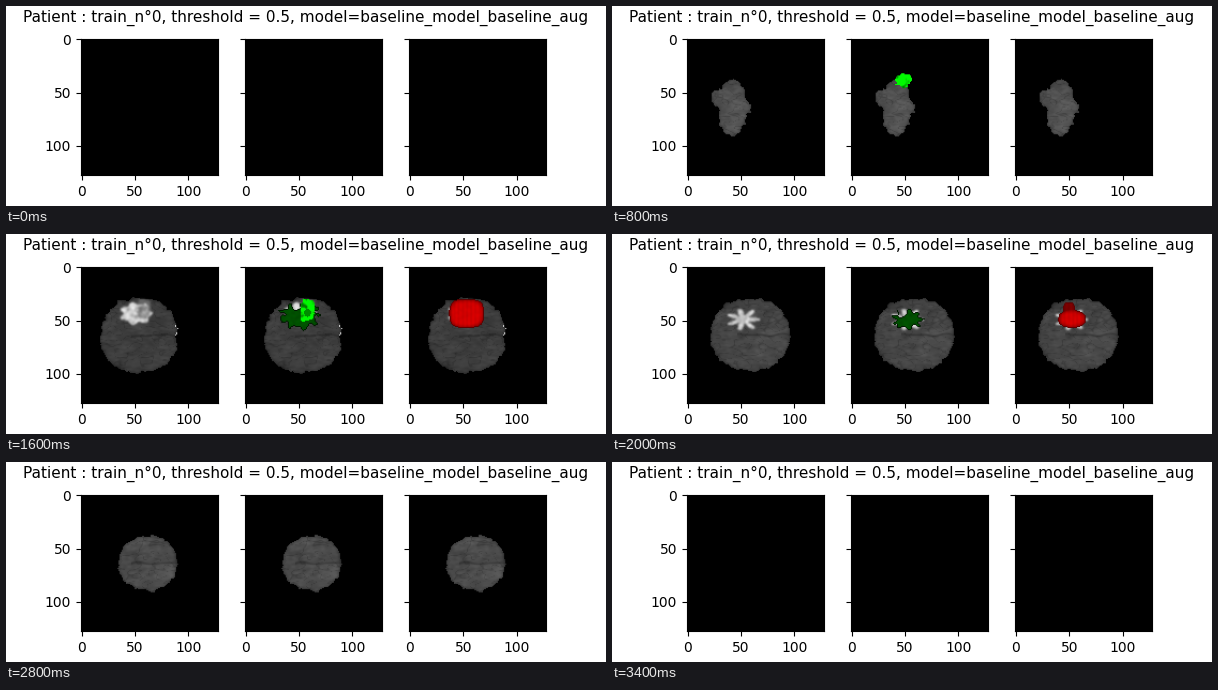
A matplotlib script that plays this animation: 600x200 px, repeating every 4 s.

```python
import numpy as np
import matplotlib.pyplot as plt
from matplotlib.animation import FuncAnimation

N, FRAMES, STEP = 128, 20, 200
FIRST, LAST = 2, 16
TITLE = "Patient : train_n°0, threshold = 0.5, model=baseline_model_baseline_aug"

# voxel centres in stage pixels of the first panel
SCALE = 136.76 / N
Y, X = np.mgrid[0:N, 0:N] * SCALE + SCALE / 2
X, Y = X + 75, Y + 32.6

# key slices: depth, centre x, centre y, radius x, radius y
HEAD = [(2, 121, 101, 14, 23), (4, 119, 102, 20, 28), (6, 126.5, 101, 32, 36.5),
        (8, 133, 102, 38, 37), (10, 138, 101, 39, 36), (13, 141, 102, 34, 33),
        (15, 143, 101, 24, 21), (16, 140.5, 98, 9, 8)]
EDEMA = [(4, 128, 76, 0, 0), (6, 129, 77, 23, 8.5), (8, 130, 82, 20, 13),
         (10, 131, 86, 15, 10), (13, 132, 86, 0, 0)]
CORE = [(3, 127, 75, 0, 0), (4, 127.5, 74.5, 8, 6.5), (6, 133, 74, 13.5, 8),
        (8, 137.5, 76.5, 7.5, 11), (10, 138, 85, 0, 0)]
GUESS = [(4, 134, 75, 0, 0), (6, 133.5, 78, 17.5, 12.5), (8, 132.5, 80, 17.5, 14.5),
         (10, 132, 85.5, 14, 9), (13, 132, 85, 0, 0)]
GLOW = [(4, 130, 75, 0, 0), (6, 133, 74.5, 14, 8.5), (8, 130, 80, 15.5, 10.5),
        (10, 131, 86, 14, 9.5), (13, 132, 85, 0, 0)]


def blur(a, sy, sx=None):
    f = np.fft.fftfreq(N)
    gy, gx = (np.exp(-2 * (np.pi * s * f) ** 2) for s in (sy, sx or sy))
    return np.fft.ifft2(np.fft.fft2(a) * np.outer(gy, gx)).real


def noise(rng, sy, sx=None):
    n = blur(rng.standard_normal((N, N)), sy, sx)
    return n / n.std()


def at(track, k):
    """Centre and radii of a track at slice k."""
    ks, *cols = zip(*track)
    return [np.interp(k, ks, c) for c in cols]


def blob(geom, x, y, p=2.0, spikes=0, amp=0.0, bend=0.0):
    cx, cy, rx, ry = geom
    if min(rx, ry) <= 0:
        return np.zeros((N, N), bool)
    u = (x - cx) / rx
    v = (y - cy - bend * u ** 2) / ry
    r = (abs(u) ** p + abs(v) ** p) ** (1 / p)
    return r < 1 + amp * (np.cos(spikes * np.arctan2(v, u)) - .5)


def rim(m):
    inner = m.copy()
    for axis in (0, 1):
        for d in (-1, 1):
            inner &= np.roll(m, d, axis)
    return m & ~inner


def head_mask(k, x, y):
    cx, cy, rx, ry = at(HEAD, k)
    if k <= 4:
        # brain base: tall body with a bump on each side
        return (blob((cx + 1, cy, rx - 6.5, ry), x, y, 2.5)
                | blob((cx - rx + 6, cy - 9, 6, 8.5), x, y)
                | blob((cx + rx - 6, cy, 6, 6.5), x, y))
    mask = blob((cx, cy, rx, ry), x, y, 2.25)
    # wedge between the two lobes, closing with depth
    tip = cx + rx - np.interp(k, [4, 5, 6, 8], [0, 20, 17, 1])
    mask &= abs(y - 101.5) > .55 * (x - tip)
    if k >= 14:
        mask |= (abs(x - cx - 4) < 2) & (abs(y - cy) < ry + 2)
    return mask


def brain(k, rng, x, y):
    mask = head_mask(k, x, y)
    body = np.clip(blur(mask.astype(float), 1.6) * 2 - 1, 0, 1)
    base = np.interp(k, [4, 6, 8, 10, 14], [84, 74, 64, 71, 77])
    folds = np.exp(-(noise(rng, 1.5, 2.6) / .2) ** 2)
    gray = base * (1 - .16 * folds) * (1 + .04 * noise(rng, .8, 1.6))
    gray *= 1 + .05 * noise(rng, 3, 5)
    gray *= .75 + .25 * body
    if k > 4:
        cleft = np.exp(-((Y - 102 - .8 * noise(rng, 4)) / 1.1) ** 2)
        gray *= 1 - .25 * cleft * (X > 125)
    gray *= mask
    if 6 <= k <= 9:
        odds = .6 * np.exp(-((Y - 98) / 7) ** 2)
        gray[rim(mask) & (X > 148) & (rng.random((N, N)) < odds)] = 215
    return gray


def add_lesion(gray, k, core, rng):
    """Brighten the swollen tissue, spikier with depth."""
    spread = .8 * blur(core.astype(float), 1)
    gray = gray * (1 - spread) + 112 * spread
    amp = np.interp(k, [6, 8, 10], [0, .12, .38])
    a = blur(blob(at(GLOW, k), X, Y, 2.4, 7, amp).astype(float), .9)
    level = np.interp(k, [4, 6, 8], [100, 165, 205]) * (1 + .06 * noise(rng, 1.2))
    if k > 6:
        cx, cy, rx, ry = at(CORE, k)
        level = level - 70 * blur(blob((cx, cy + 2, rx - 1, ry - 4), X, Y), 1)
    return gray * (1 - a) + level * a


def paint(img, mask, channel, level):
    img[mask] = 0
    img[..., channel][mask] = np.broadcast_to(level, (N, N))[mask]


def panels(k):
    """RGB images of one slice: scan, annotation, prediction."""
    if not FIRST <= k <= LAST:
        return [np.zeros((N, N, 3), np.uint8)] * 3
    rng = np.random.default_rng(40 + k)
    x, y = X + .7 * noise(rng, 1.2), Y + .7 * noise(rng, 1.2)
    gray = brain(k, rng, x, y)
    grain = noise(rng, 1.1)

    core = blob(at(CORE, k), x, y, 2.6)
    edema = blob(at(EDEMA, k), x, y, 2.4, 9, .14, bend=max(0, 3.5 * (8 - k)))
    if k >= 7:
        gap = np.interp(k, [8, 10], [72, 78])
        edema &= ~blob((126, gap, 4, 4.5), x, y)
    main = blob(at(GUESS, k), X, Y, np.interp(k, [8, 10], [3, 2.2]))
    cap = blob((129, 75, 5.5, 6), X, Y, 3) & (9 <= k <= 11)
    guess = main | cap

    if k > 4:
        gray = add_lesion(gray, k, core, rng)
    scan = np.repeat(gray[..., None], 3, axis=2)
    truth, pred = scan.copy(), scan.copy()

    paint(truth, edema, 1, 80 + 3 * grain)
    paint(truth, rim(edema), 1, 24)
    paint(truth, core, 1, np.clip(300 + 75 * grain, 120, 250))
    if k >= 7:
        cx, cy, rx, ry = at(CORE, k)
        paint(truth, blob((cx, cy + 3, rx - 4, ry - 7), X, Y), 1, 140)

    depth = np.clip(blur(main.astype(float), 2.6) * 2 - .9, 0, 1)
    paint(pred, guess, 0, 122 + 88 * depth + 6 * np.sin(1.5 * X) + 3 * grain)
    paint(pred, rim(guess), 0, 95)
    return [np.clip(p, 0, 255).astype(np.uint8) for p in (scan, truth, pred)]


slices = [panels(k) for k in range(FRAMES)]

fig, axes = plt.subplots(1, 3, sharey=True, figsize=(6, 2), dpi=100)
fig.suptitle(TITLE, fontsize=11)
views = [ax.imshow(img) for ax, img in zip(axes, slices[0])]
for ax in axes:
    ax.set_xticks([0, 50, 100])
    ax.set_yticks([0, 50, 100])


def update(k):
    for view, img in zip(views, slices[k]):
        view.set_data(img)
    return views


anim = FuncAnimation(fig, update, frames=FRAMES, interval=STEP,
                     repeat=True, repeat_delay=0)
plt.show()
```
